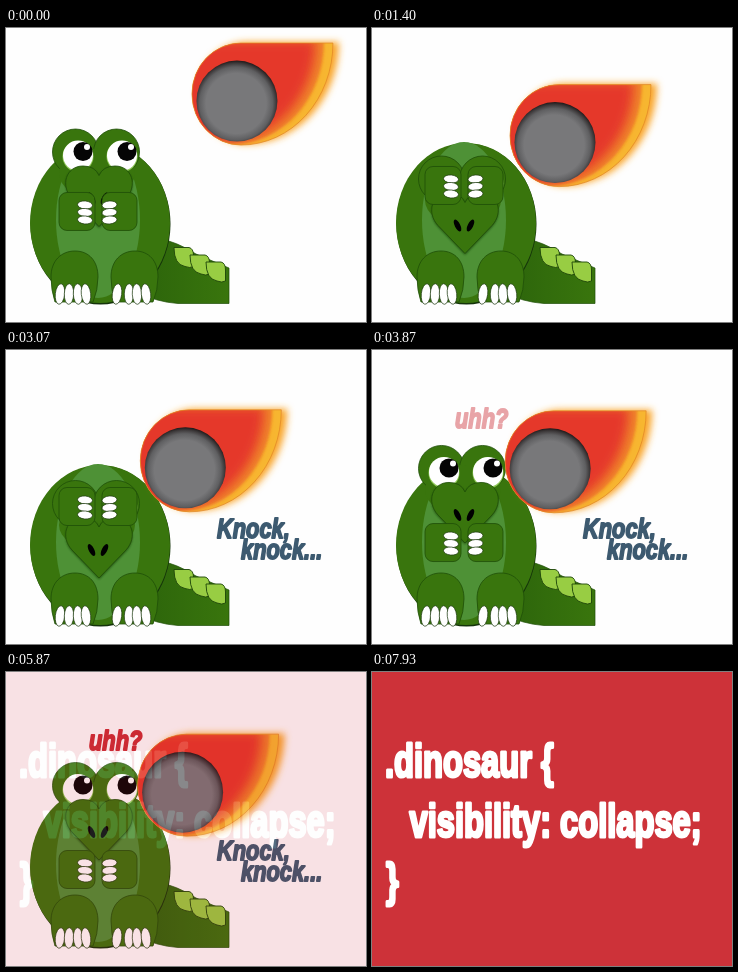
An HTML page for the animation above (8740 ms loop, 360 by 294 pixels).

```html
<!DOCTYPE html>
<html lang="en">
<head>
<meta charset="utf-8">
<title>Knock, knock</title>
<style>
  html, body { margin: 0; width: 100%; height: 100%; overflow: hidden; background: #fefefe; }
  svg { display: block; width: 100vw; height: 100vh; }
  text { font-family: "Liberation Sans", Arial, sans-serif; font-weight: bold; white-space: pre; stroke-linejoin: round; }
  .say { font-size: 28px; font-style: italic; stroke-width: 1.9; }
  .code { font-size: 46px; fill: #fff; stroke: #fff; stroke-width: 3.2; }
  .skin { fill: #39750d; stroke: #1f4f08; stroke-width: .8; }
  .nail { fill: #fff; stroke: #1d3a10; stroke-width: .7; }
  .plate { fill: #98cd43; stroke: #1c4508; stroke-width: .9; }
</style>
</head>
<body>
<svg viewBox="0 0 360 294" preserveAspectRatio="none">
  <defs>
    <path id="flame" d="M186 66A49 51 0 0 1 235 15H327A92 102 0 0 1 235 117A49 51 0 0 1 186 66Z"/>
    <clipPath id="flameClip"><use href="#flame"/></clipPath>
    <filter id="soft1" x="-20%" y="-20%" width="140%" height="140%"><feGaussianBlur stdDeviation="1.2"/></filter>
    <filter id="soft4" x="-20%" y="-20%" width="140%" height="140%"><feGaussianBlur stdDeviation="3.8"/></filter>
    <filter id="soft6" x="-20%" y="-20%" width="140%" height="140%"><feGaussianBlur stdDeviation="5.5"/></filter>
    <radialGradient id="rock" cx=".49" cy=".53" r=".53">
      <stop offset=".7" stop-color="#78787a"/>
      <stop offset=".85" stop-color="#5f5f61"/>
      <stop offset=".94" stop-color="#3c3839"/>
      <stop offset="1" stop-color="#1f1919"/>
    </radialGradient>
    <linearGradient id="tailFill">
      <stop offset="0" stop-color="#2c640b"/>
      <stop offset="1" stop-color="#39750d"/>
    </linearGradient>
    <path id="plate" d="M0 0H15Q19.500 1 19.500 8V19Q16 21 11 19Q0 17 0 0Z"/>
    <path id="leg" d="M-20 274Q-24 262 -24 249C-24 233 -14 223 0 223S23 233 23 249Q23 262 18 274Z"/>
    <path id="face" d="M93 188L66 160C54 147 60 127.500 77 127.500Q89 127.500 93 137Q97 127.500 109 127.500C126 127.500 132 147 120 160Z"/>
  </defs>

  <rect width="360" height="294" fill="#fefefe"/>

  <path d="M148 209Q172 214 190 226L223 240V275.5H172Q150 274 132 264Z" fill="url(#tailFill)" stroke="#1f4f08" stroke-width=".7"/>
  <use class="plate" href="#plate" x="168" y="219.5"/>
  <use class="plate" href="#plate" x="184" y="227"/>
  <use class="plate" href="#plate" x="200" y="234"/>
  <ellipse cx="94.5" cy="196" rx="70" ry="80.5" fill="#14330a"/>
  <ellipse cx="94" cy="195" rx="70" ry="80" fill="#39750d"/>
  <ellipse cx="92" cy="192" rx="42" ry="78" fill="#4e9136"/>

  <g id="head">
    <circle class="skin" cx="69.5" cy="113.5" r="23"/>
    <circle class="skin" cx="110.5" cy="113.5" r="23"/>
    <ellipse cx="91" cy="135" rx="38" ry="25" fill="#39750d"/>
    <g id="eyes"></g>
    <use href="#face" y="1.2" fill="#173f08" opacity=".8" filter="url(#soft1)"/>
    <use href="#face" class="skin"/>
    <ellipse cx="85.500" cy="160" rx="2.700" ry="6.500" transform="rotate(-27 85.500 160)"/>
    <ellipse cx="98.500" cy="160" rx="2.700" ry="6.500" transform="rotate(27 98.500 160)"/>
  </g>

  <g id="arms">
    <rect class="skin" x="53" y="178.5" width="36" height="38" rx="8"/>
    <rect class="skin" x="96" y="178.5" width="35" height="38" rx="8"/>
  </g>
  <g id="legs">
    <use class="skin" href="#leg" x="69"/>
    <use class="skin" href="#leg" x="129"/>
  </g>

  <g id="meteor">
    <use href="#flame" x="6" y="-1" fill="#f9a62b" filter="url(#soft4)"/>
    <use href="#flame" fill="#f7b630"/>
    <g clip-path="url(#flameClip)">
      <use href="#flame" x="-9" y="-1" fill="#f0862b" filter="url(#soft1)"/>
      <use href="#flame" x="-17" y="-3" fill="#e5372b" filter="url(#soft6)"/>
    </g>
    <use href="#flame" fill="none" stroke="#e08426" stroke-width=".7"/>
    <circle cx="231" cy="73" r="40.5" fill="url(#rock)"/>
  </g>

  <g id="knock" class="say" fill="#3d5a70" stroke="#3d5a70">
    <text transform="translate(211 188) scale(.78 1)">Knock,</text>
    <text transform="translate(235 209) scale(.78 1)">knock...</text>
  </g>
  <g id="uhh" class="say" fill="#cc2d35" stroke="#cc2d35">
    <text transform="translate(83 78) scale(.78 1)">uhh?</text>
  </g>

  <g id="card">
    <rect id="red" width="360" height="294"/>
    <g class="code">
      <text transform="translate(13 104.500) scale(.71 1)">.dinosaur {</text>
      <text transform="translate(37.500 164.500) scale(.71 1)">visibility: collapse;</text>
      <text transform="translate(14 223.500) scale(.71 1)">}</text>
    </g>
  </g>
</svg>
<script>
const LOOP = 8740;
const $ = id => document.getElementById(id);

function add(parent, tag, attrs) {
  const el = document.createElementNS("http://www.w3.org/2000/svg", tag);
  for (const k in attrs) el.setAttribute(k, attrs[k]);
  $(parent).appendChild(el);
}

for (const x of [72, 116]) {
  add("eyes", "circle", { cx: x, cy: 118, r: 15.5, fill: "#8fc858" });
  add("eyes", "circle", { cx: x, cy: 117, r: 15, fill: "#fff" });
  add("eyes", "circle", { cx: x + 5, cy: 113, r: 9.5, fill: "#050505" });
  add("eyes", "circle", { cx: x + 9, cy: 108.5, r: 3, fill: "#fff" });
}
for (const [x, tilt] of [[79, 5], [103.5, -5]]) {
  for (const y of [191, 198.5, 206]) {
    add("arms", "ellipse", { class: "nail", cx: x, cy: y, rx: 7.5, ry: 4, transform: `rotate(${tilt} ${x} ${y})` });
  }
}
for (const cx of [54, 63, 72, 80, 111, 123, 131, 140]) {
  const tilt = ((cx < 95 ? 67 : 126) - cx) / 2;
  add("legs", "ellipse", { class: "nail", cx, cy: 266, rx: 4.7, ry: 10.3, transform: `rotate(${tilt} ${cx} 266)` });
}

// Smooth curve through [time, value] points without overshoot.
function track(points) {
  const n = points.length - 1;
  const slope = i => (points[i + 1][1] - points[i][1]) / (points[i + 1][0] - points[i][0]);
  const tangent = i => {
    if (i === 0) return slope(0);
    if (i === n) return 0;
    const a = slope(i - 1), b = slope(i);
    return a * b > 0 ? 2 * a * b / (a + b) : 0;
  };
  return t => {
    if (t >= points[n][0]) return points[n][1];
    let i = 0;
    while (t >= points[i + 1][0]) i++;
    const [t0, a] = points[i], [t1, b] = points[i + 1];
    const d = t1 - t0, u = (t - t0) / d, v = 1 - u;
    return a * v * v * (1 + 2 * u) + b * u * u * (3 - 2 * u)
      + d * u * v * (v * tangent(i) - u * tangent(i + 1));
  };
}

// Duck down, hold, then come back up quickly and settle.
const headY = track([[0, 10.5], [600, 27], [1400, 37.5], [2400, 40], [3150, 40], [3650, 10], [4300, 0]]);
const armsY = track([[0, -14], [600, -28], [1400, -40], [2400, -41], [3150, -41], [3650, -10], [4300, 0]]);
const fall = track([[0, 0], [600, 29.5], [930, 39.5], [1400, 48], [3070, 51.7], [4730, 53.7], [6400, 54.5]]);

const ramp = (t, from, to) => Math.min(1, Math.max(0, (t - from) / (to - from)));
const move = (id, x, y) => $(id).setAttribute("transform", `translate(${x} ${y})`);
const fade = (id, a) => $(id).setAttribute("opacity", a);

function draw(t) {
  move("head", 0, headY(t));
  move("arms", 0, armsY(t));
  const d = fall(t);
  move("meteor", -d, d * .867);
  fade("knock", ramp(t, 2200, 2700));
  fade("uhh", ramp(t, 3700, 4100));
  fade("card", ramp(t, 5800, 6400));
  const k = ramp(t, 6270, 6400);
  $("red").setAttribute("fill", `rgb(${207 - 2 * k},${20 + 30 * k},${42 + 15 * k})`);
}

const start = performance.now();
function tick() {
  draw((performance.now() - start) % LOOP);
  requestAnimationFrame(tick);
}
tick();
</script>
</body>
</html>
```
